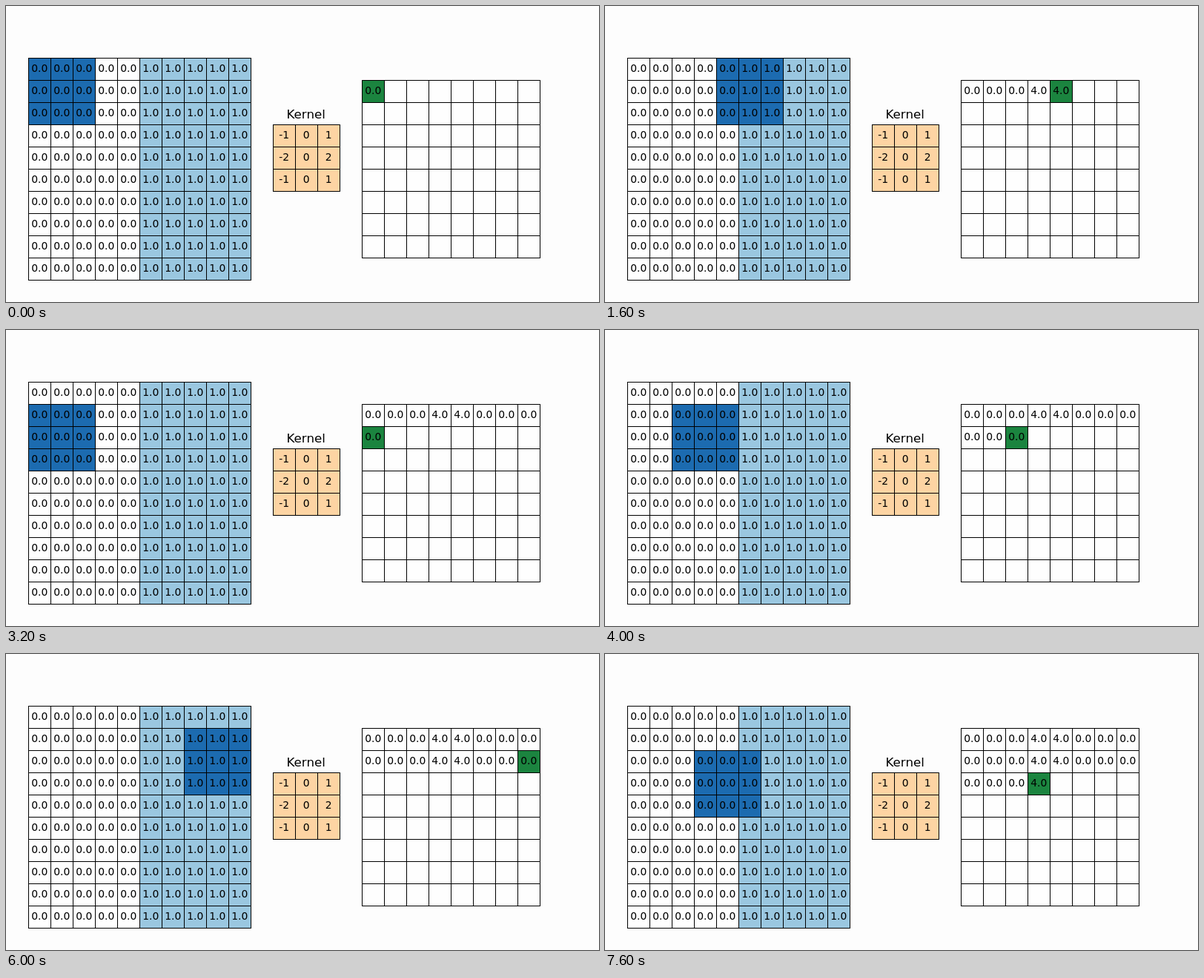
Recreate the animation shown at these times as an HTML page. Size 800 by 400 pixels, loop 8 s.

```html
<!DOCTYPE html>
<html lang="en">
<head>
<meta charset="utf-8">
<title>Convolution</title>
<style>
  html, body { margin: 0; width: 100%; height: 100%; overflow: hidden; background: #fdfdfd; }
  svg { display: block; width: 800px; height: 400px; }
  text { font: 13.89px "DejaVu Sans", sans-serif; text-anchor: middle; }
  .title { font-size: 16.67px; }
</style>
</head>
<body>
<svg id="stage" viewBox="0 0 800 400"></svg>
<script>
const CELL = 30, STEP = 400, LOOP = 8000;
const IN = 10, OUT = 8;
const WHITE = '#fefefe', LIGHT = '#9ac7e0', DARK = '#1c6bb0', GREEN = '#1b843f', SAND = '#fdd4a3';
const stage = document.getElementById('stage');

function add(tag, attrs, content = '') {
  const el = document.createElementNS('http://www.w3.org/2000/svg', tag);
  for (const key in attrs) el.setAttribute(key, attrs[key]);
  el.textContent = content;
  stage.appendChild(el);
  return el;
}

// Builds a square grid and returns its cells as rows of {box, label}.
function makeGrid(x, y, size, fill, label) {
  const rows = [];
  for (let r = 0; r < size; r++) {
    rows.push([]);
    for (let c = 0; c < size; c++) {
      const left = x + c * CELL, top = y + r * CELL;
      rows[r].push({
        box: add('rect', { x: left, y: top, width: CELL, height: CELL, fill: fill(r, c) }),
        label: add('text', { x: left + 15.2, y: top + 19 }, label(r, c))
      });
    }
  }
  let d = '';
  const span = size * CELL + 1;
  for (let i = 0; i <= size; i++) {
    const at = i * CELL + 0.5;
    d += `M${x} ${y + at}h${span}M${x + at} ${y}v${span}`;
  }
  add('path', { d, stroke: '#000', fill: 'none' });
  return rows;
}

const kernel = [[-1, 0, 1], [-2, 0, 2], [-1, 0, 1]];
const pixel = (r, c) => c < IN / 2 ? 0 : 1;
const shade = (r, c) => pixel(r, c) ? LIGHT : WHITE;

function convolve(r, c) {
  let sum = 0;
  kernel.forEach((row, i) => row.forEach((k, j) => { sum += k * pixel(r + i, c + j); }));
  return sum.toFixed(1);
}

const input = makeGrid(30, 70, IN, shade, (r, c) => pixel(r, c).toFixed(1));
makeGrid(360, 160, 3, () => SAND, (r, c) => kernel[r][c]);
const output = makeGrid(480, 100, OUT, () => WHITE, convolve);
add('text', { x: 404.7, y: 152, class: 'title' }, 'Kernel');

function eachCell(grid, visit) {
  grid.forEach((row, r) => row.forEach((cell, c) => visit(cell, r, c)));
}

function draw(time) {
  const step = Math.floor((time % LOOP) / STEP);
  const row = Math.floor(step / OUT), col = step % OUT;
  eachCell(input, (cell, r, c) => {
    const covered = r >= row && r < row + 3 && c >= col && c < col + 3;
    cell.box.setAttribute('fill', covered ? DARK : shade(r, c));
  });
  eachCell(output, (cell, r, c) => {
    const index = r * OUT + c;
    cell.box.setAttribute('fill', index === step ? GREEN : WHITE);
    cell.label.setAttribute('visibility', index <= step ? 'visible' : 'hidden');
  });
}

const start = performance.now();
function tick() {
  draw(performance.now() - start);
  requestAnimationFrame(tick);
}
draw(0);
requestAnimationFrame(tick);
</script>
</body>
</html>
```
